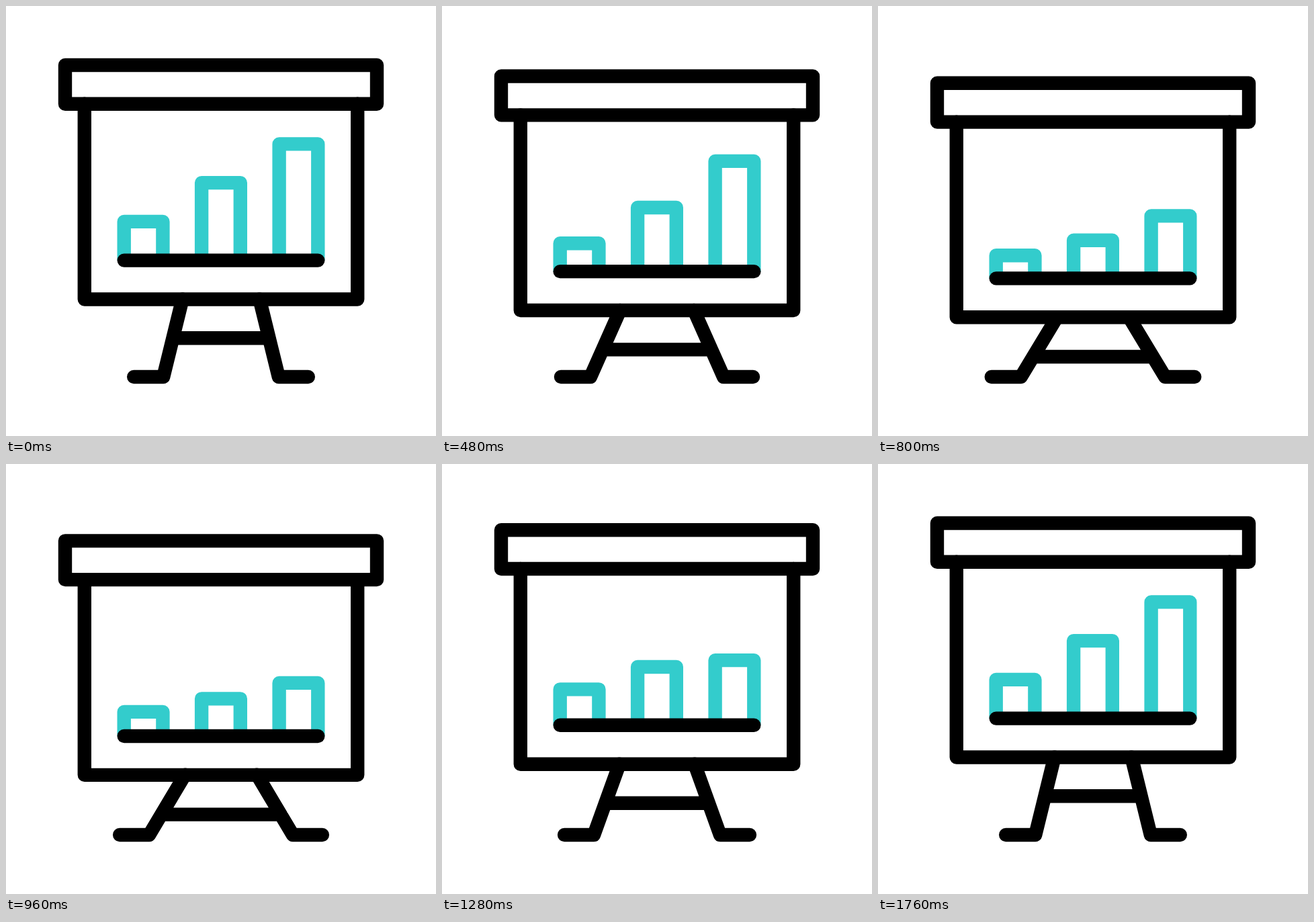
An HTML page that plays this animation: 640x640 px, repeating every 2080 ms.

```html
<!DOCTYPE html>
<html lang="en">
<head>
<meta charset="utf-8">
<title>Presentation board</title>
<style>
  html, body { margin: 0; width: 100%; height: 100%; overflow: hidden; background: #fff; }
  svg { display: block; width: 100%; height: 100%; }
  path { fill: none; stroke: #000; stroke-width: 20.4; stroke-linejoin: round; stroke-linecap: round; }
  .bar { stroke: #3cc; stroke-linecap: butt; }
</style>
</head>
<body>
<svg viewBox="0 0 640 640">
  <path id="legs"/>
  <g id="board">
    <path d="M88 88H552V145.8H88Z"/>
    <path d="M116.8 145.8V436.5H523.2V145.8"/>
    <path class="bar"/>
    <path class="bar"/>
    <path class="bar"/>
    <path d="M175.7 378.6H464.3"/>
  </g>
</svg>
<script>
const LOOP = 2080, STEP = 40, MOVE = 733, BASE = 378.6;
const board = document.getElementById('board');
const legs = document.getElementById('legs');
const barPaths = document.querySelectorAll('.bar');

const drop = { size: 26.8, out: 74, back: 873 };
const bars = [
  { x: 175.7, height: 57.7, size: 23.5, out: 54, back: 789 },
  { x: 291.1, height: 115.5, size: 60.3, out: 169, back: 906 },
  { x: 406.6, height: 173.2, size: 95.2, out: 296, back: 1030 }
];

// Symmetric cubic ease, control points (.55, 0) and (.45, 1)
function ease(x) {
  if (x <= 0) return 0;
  if (x >= 1) return 1;
  let lo = 0, hi = 1;
  for (let i = 0; i < 24; i++) {
    const s = (lo + hi) / 2, r = 1 - s;
    const at = 3 * r * r * s * 0.55 + 3 * r * s * s * 0.45 + s * s * s;
    if (at < x) lo = s; else hi = s;
  }
  return lo * lo * (3 - 2 * lo);
}

function shift(m, t) {
  return m.size * (ease((t - m.out) / MOVE) - ease((t - m.back) / MOVE));
}

function legPath(d) {
  const topX = 262.6 + 0.14 * d, topY = 436.5 + d;
  const footX = 234.2 - 0.8 * d, footY = 552;
  const railY = 494.2 + 1.04 * d;
  const railX = topX + (footX - topX) * (railY - topY) / (footY - topY);
  const leg = fx =>
    `M${fx(topX)} ${topY}L${fx(footX)} ${footY}H${fx(footX - 44)}`;
  return leg(x => x) + leg(x => 640 - x) + `M${railX} ${railY}H${640 - railX}`;
}

function draw(t) {
  const d = shift(drop, t);
  board.setAttribute('transform', `translate(0 ${d})`);
  legs.setAttribute('d', legPath(d));
  bars.forEach((b, i) => {
    const top = BASE - b.height + shift(b, t);
    barPaths[i].setAttribute('d', `M${b.x} ${BASE}V${top}h57.7V${BASE}`);
  });
}

const start = performance.now();
function tick() {
  const t = (performance.now() - start) % LOOP;
  draw(Math.floor(t / STEP) * STEP);
  requestAnimationFrame(tick);
}
tick();
</script>
</body>
</html>
```
